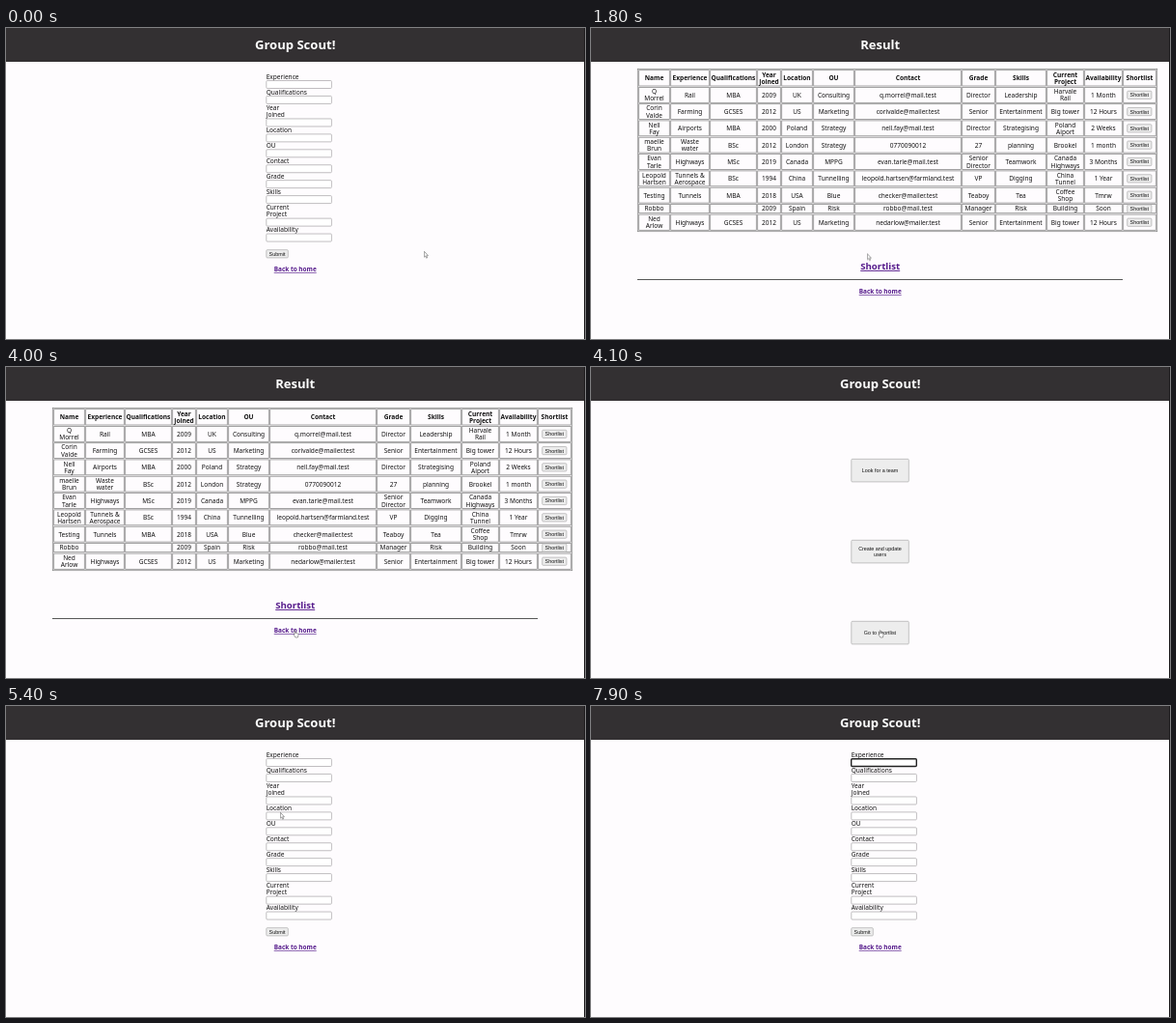
Recreate the animation shown at these times as an HTML page. Size 600 by 322 pixels, loop 8000 ms.

```html
<!DOCTYPE html>
<html lang="en">
<head>
<meta charset="utf-8">
<title>Group Scout!</title>
<style>
html, body { margin: 0; width: 100%; height: 100%; overflow: hidden; background: #fefcfe; }
svg { display: block; width: 600px; height: 322px; }
text { font: 6.55px "Noto Sans", "Open Sans", sans-serif; fill: #111; }
.mid { text-anchor: middle; }
.bold { font-weight: 700; }
.title { font-size: 13.05px; font-weight: 700; fill: #fff; }
.link { font-size: 6.45px; font-weight: 700; fill: #551a8b; text-decoration: underline; }
.big { font-size: 9.65px; }
.ui { font: 5.4px "Liberation Sans", Arial, sans-serif; }
.cell { fill: none; stroke: #858585; stroke-width: .75; }
.field { fill: #fff; stroke: #b0aeb0; stroke-width: .8; }
.button { fill: #ededed; stroke: #b4b4b4; stroke-width: .8; }
.cursor path { fill: #fff; stroke: #666; stroke-width: .6; stroke-linejoin: round; }

#form, #result, #home, #submit, #look, #focus, #caret, #arrow, #hand { animation: 8s step-end infinite; }
#form { animation-name: form; }
#result { animation-name: result; }
#home { animation-name: home; }
#submit { animation-name: submit; }
#look { animation-name: look; }
#focus { fill: #fff; stroke: #222; stroke-width: 1.4; animation-name: focus; }
#caret { animation-name: caret; }
#arrow { animation-name: arrow; }
#hand { animation-name: hand; }
#pointer { animation: move 8s ease-in-out infinite; }

@keyframes form { 0%, 66.25% { visibility: visible } 22.5% { visibility: hidden } }
@keyframes result { 0%, 51.25% { visibility: hidden } 22.5% { visibility: visible } }
@keyframes home { 0%, 66.25% { visibility: hidden } 51.25% { visibility: visible } }
@keyframes submit { 0%, 22.5% { fill: #ededed; stroke: #b4b4b4 } 12.5% { fill: #dedede; stroke: #969696 } }
@keyframes look { 0%, 66.25% { fill: #ededed } 65% { fill: #dedede } }
@keyframes focus { 0% { opacity: 0 } 91.25%, 100% { opacity: 1 } }
@keyframes caret { 0%, 97.5% { opacity: 0 } 91.25% { opacity: 1 } }
@keyframes arrow { 0%, 52.5% { opacity: 1 } 42.5%, 81.25%, 91.25% { opacity: 0 } 85% { opacity: 1 } }
@keyframes hand { 0%, 52.5%, 85% { opacity: 0 } 42.5%, 81.25% { opacity: 1 } }
@keyframes move {
  0% { transform: translate(433px, 231px) }
  7.5%, 8.75% { transform: translate(311px, 224px) }
  13.75%, 23.75% { transform: translate(286px, 233.5px) }
  28.75%, 35% { transform: translate(290px, 246px) }
  42.5%, 47.5% { transform: translate(298px, 271px) }
  48.75%, 51.25% { transform: translate(298px, 272px) }
  58.75%, 62.4% { transform: translate(283px, 109px) }
  62.5%, 70% { transform: translate(284px, 110px) }
  81.25%, 83.75% { transform: translate(306px, 245px) }
  91.25%, 100% { transform: translate(290px, 57px) }
}
</style>
</head>
<body>
<svg viewBox="0 0 600 322">
  <rect width="600" height="322" fill="#fefcfe"/>
  <rect width="600" height="35" fill="#333032"/>
  <g id="form"></g>
  <g id="result"></g>
  <g id="home"></g>
  <rect x="599" width="1" height="322" fill="#1c1a1c"/>
  <g id="pointer" class="cursor">
    <path id="arrow" d="M.4 .3V6.2L1.7 5L2.6 7.2L3.6 6.8L2.7 4.7H4.4Z"/>
    <path id="hand" d="M1 4.5V1.2Q1.5 .3 2 1.2V3.4L4.6 4Q5.1 4.3 5 5.2L4.4 8H1.9L.2 5.3Q.1 4.5 1 5Z"/>
  </g>
</svg>
<script>
const page = id => {
  const parts = [];
  return {
    rect(x, y, w, h, cls, id = '') {
      parts.push(`<rect x="${x}" y="${y}" width="${w}" height="${h}" class="${cls}"` +
        `${id && ` id="${id}"`}${cls === 'cell' ? '' : ' rx="1"'}/>`);
    },
    // Lines split at "/" are centred vertically on y.
    text(x, y, value, cls = '', lead = 7.3, drop = 2.35) {
      const lines = value.split('/');
      lines.forEach((line, i) => {
        const base = y + drop + (i - (lines.length - 1) / 2) * lead;
        parts.push(`<text x="${x}" y="${base}" class="${cls}">${line}</text>`);
      });
    },
    label(x, y, value) { this.text(x, y, value, 'ui mid', 6.5, 1.9); },
    title(value) { this.text(299.7, 17.5, value, 'title mid', 0, 4.6); },
    raw(markup) { parts.push(markup); },
    show() { document.getElementById(id).innerHTML = parts.join(''); }
  };
};

const form = page('form');
form.title('Group Scout!');
let y = 50.5;
for (const name of ['Experience', 'Qualifications', 'Year/Joined', 'Location', 'OU', 'Contact',
  'Grade', 'Skills', 'Current/Project', 'Availability']) {
  const extra = name.includes('/') ? 7.6 : 0;
  form.text(269.7, y + extra / 2, name);
  y += extra;
  form.rect(269.8, y + 4, 67.6, 8, 'field');
  y += 15.93;
}
form.rect(269.7, 54.7, 67.6, 7.8, '', 'focus');
form.raw('<rect id="caret" x="271.6" y="56" width=".6" height="5"/>');
form.rect(269.8, 229.7, 22.5, 8.2, 'button', 'submit');
form.label(281, 233.8, 'Submit');
form.text(299.7, 250, 'Back to home', 'link mid');
form.show();

const columns = [49, 82, 123, 172, 197, 230, 273, 384, 419, 472, 511, 551, 586];
const lines = [43, 60.7, 78, 95.2, 112.5, 129.8, 147.2, 164.5, 181.8, 192.4, 210];
const rows = `Name|Experience|Qualifications|Year/Joined|Location|OU|Contact|Grade|Skills|Current/Project|Availability|Shortlist
Q/Morrel|Rail|MBA|2009|UK|Consulting|q.morrel@mail.test|Director|Leadership|Harvale/Rail|1 Month
Corin/Valde|Farming|GCSES|2012|US|Marketing|corivalde@mailer.test|Senior|Entertainment|Big tower|12 Hours
Nell/Fay|Airports|MBA|2000|Poland|Strategy|nell.fay@mail.test|Director|Strategising|Poland/Aiport|2 Weeks
maelle/Brun|Waste/water|BSc|2012|London|Strategy|0770090012|27|planning|Brookel|1 month
Evan/Tarle|Highways|MSc|2019|Canada|MPPG|evan.tarle@mail.test|Senior/Director|Teamwork|Canada/Highways|3 Months
Leopold/Hartsen|Tunnels &amp;/Aerospace|BSc|1994|China|Tunnelling|leopold.hartsen@farmland.test|VP|Digging|China/Tunnel|1 Year
Testing|Tunnels|MBA|2018|USA|Blue|checker@mailer.test|Teaboy|Tea|Coffee/Shop|Tmrw
Robbo|||2009|Spain|Risk|robbo@mail.test|Manager|Risk|Building|Soon
Ned/Arlow|Highways|GCSES|2012|US|Marketing|nedarlow@mailer.test|Senior|Entertainment|Big tower|12 Hours`
  .split('\n').map(row => row.split('|'));

const result = page('result');
result.title('Result');
result.rect(48.3, 42.3, 538.4, 168.4, 'cell');
rows.forEach((row, r) => {
  const top = lines[r], height = lines[r + 1] - top, middle = top + height / 2;
  columns.slice(0, -1).forEach((left, c) => {
    const width = columns[c + 1] - left;
    result.rect(left + .7, top + .7, width - 1.4, height - 1.4, 'cell');
    if (row[c]) result.text(left + width / 2, middle, row[c], r ? 'mid' : 'mid bold');
  });
  if (r) {
    result.rect(555.7, middle - 4.1, 25.2, 8.2, 'button');
    result.label(568.3, middle, 'Shortlist');
  }
});
result.text(299.7, 246.5, 'Shortlist', 'link big mid', 0, 3.4);
result.raw('<rect x="48" y="260" width="503" height=".9" fill="#444"/>');
result.text(299.7, 273, 'Back to home', 'link mid');
result.show();

const home = page('home');
home.title('Group Scout!');
['Look for a team', 'Create and update/users', 'Go to shortlist'].forEach((name, i) => {
  const top = 95.3 + i * 84;
  home.rect(269.8, top, 59.5, 23.6, 'button', i ? '' : 'look');
  home.label(299.5, top + 11.7, name);
});
home.show();
</script>
</body>
</html>
```
